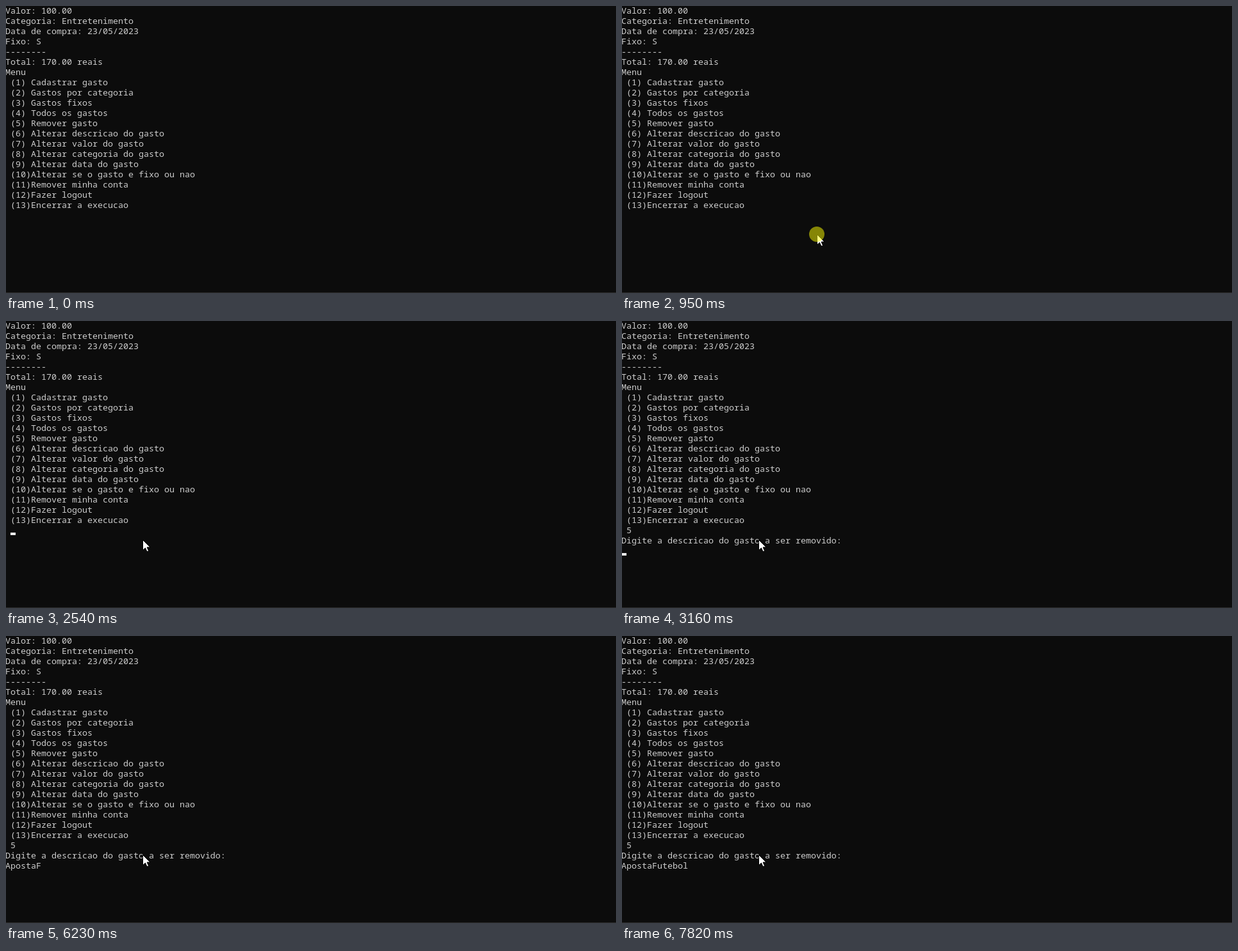
Write an HTML page that moves like this. It is 952 by 449 pixels and loops after 8000 ms.

```html
<!DOCTYPE html>
<html lang="pt">
<head>
<meta charset="utf-8">
<title>Menu</title>
<style>
html, body { margin: 0; width: 100%; height: 100%; overflow: hidden; background: #0c0c0c; }
svg { display: block; width: 952px; height: 449px; }
text { font: 13.3333px "Noto Sans Mono", "Liberation Mono", monospace; fill: #ccc; white-space: pre; }
</style>
</head>
<body>
<svg viewBox="0 0 952 449">
  <rect width="952" height="449" fill="#0c0c0c"/>
  <rect y="448" width="952" height="1" fill="#2b2b2b"/>
  <g id="screen"></g>
  <rect id="caret" width="8" height="4" fill="#f2f2f2" shape-rendering="crispEdges"/>
  <path id="mouse" d="M.5 .5V16.7L4.4 13L7 18.8L9.6 17.7L7.1 12H12Z" fill="#fff" stroke="#000"/>
  <circle id="click" cx="304" cy="357" r="12" fill="#ff0" opacity=".5"/>
</svg>
<script>
const LOOP = 8000, CELL = 8, ROW = 16;
const $ = id => document.getElementById(id);
const screen = $("screen"), caret = $("caret"), mouse = $("mouse"), click = $("click");

const lines = `Valor: 100.00
Categoria: Entretenimento
Data de compra: 23/05/2023
Fixo: S
--------
Total: 170.00 reais
Menu
 (1) Cadastrar gasto
 (2) Gastos por categoria
 (3) Gastos fixos
 (4) Todos os gastos
 (5) Remover gasto
 (6) Alterar descricao do gasto
 (7) Alterar valor do gasto
 (8) Alterar categoria do gasto
 (9) Alterar data do gasto
 (10)Alterar se o gasto e fixo ou nao
 (11)Remover minha conta
 (12)Fazer logout
 (13)Encerrar a execucao`.split("\n");

function addLine(row, str) {
  const el = document.createElementNS("http://www.w3.org/2000/svg", "text");
  el.setAttribute("x", -1);
  el.setAttribute("y", row * ROW + 12);
  el.textContent = str;
  screen.append(el);
  return el;
}
lines.forEach((s, i) => addLine(i, s));
const choice = addLine(20, ""), prompt = addLine(21, ""), answer = addLine(22, "");

const word = "ApostaFutebol";
const keys = [4500, 5090, 5160, 5290, 5490, 5560, 6230, 6420, 6620, 6970, 7030, 7300, 7430];
const caretOn = [[1480, 2010], [2540, 3090], [3160, 4160], [4500, 4690], [5090, 5700],
  [6420, 6750], [6970, 7820]];
const within = (t, [a, b]) => t >= a && t < b;

// The pointer is sampled in discrete steps.
const stepped = (t, start, gap, n) =>
  Math.max(0, Math.min(n, Math.floor((t - start) / gap + 0.05) + 1)) / n;

function pointerAt(t) {
  if (t < 1220) {
    const p = (stepped(t, 260, 68, 10) - 0.1) / 0.9, q = (1 - p) ** 2;
    return [304 + 404 * q, 357 + 76 * q];
  }
  const p = stepped(t, 1220, 65.7, 8);
  return [Math.round(304 - 91 * p ** 1.35 ), Math.round(357 - 15 * p ** 1.5)];
}

function draw(t) {
  const typed = keys.filter(k => t >= k).length;
  choice.textContent = t >= 2740 ? " 5" : "";
  prompt.textContent = t >= 3160 ? "Digite a descricao do gasto a ser removido:" : "";
  answer.textContent = word.slice(0, typed);

  const entered = t >= 3160;
  const col = entered ? typed : t >= 2740 ? 2 : 1;
  caret.setAttribute("x", col * CELL - 1);
  caret.setAttribute("y", (entered ? 22 : 20) * ROW + 11);
  caret.style.display = caretOn.some(s => within(t, s)) ? "" : "none";

  const [x, y] = pointerAt(t);
  mouse.setAttribute("transform", `translate(${Math.round(x)} ${Math.round(y)})`);
  mouse.style.display = t >= 260 ? "" : "none";
  click.style.display = within(t, [950, 1010]) ? "" : "none";
}

const begin = performance.now();
function tick() {
  draw((performance.now() - begin) % LOOP);
  requestAnimationFrame(tick);
}
tick();
</script>
</body>
</html>
```
